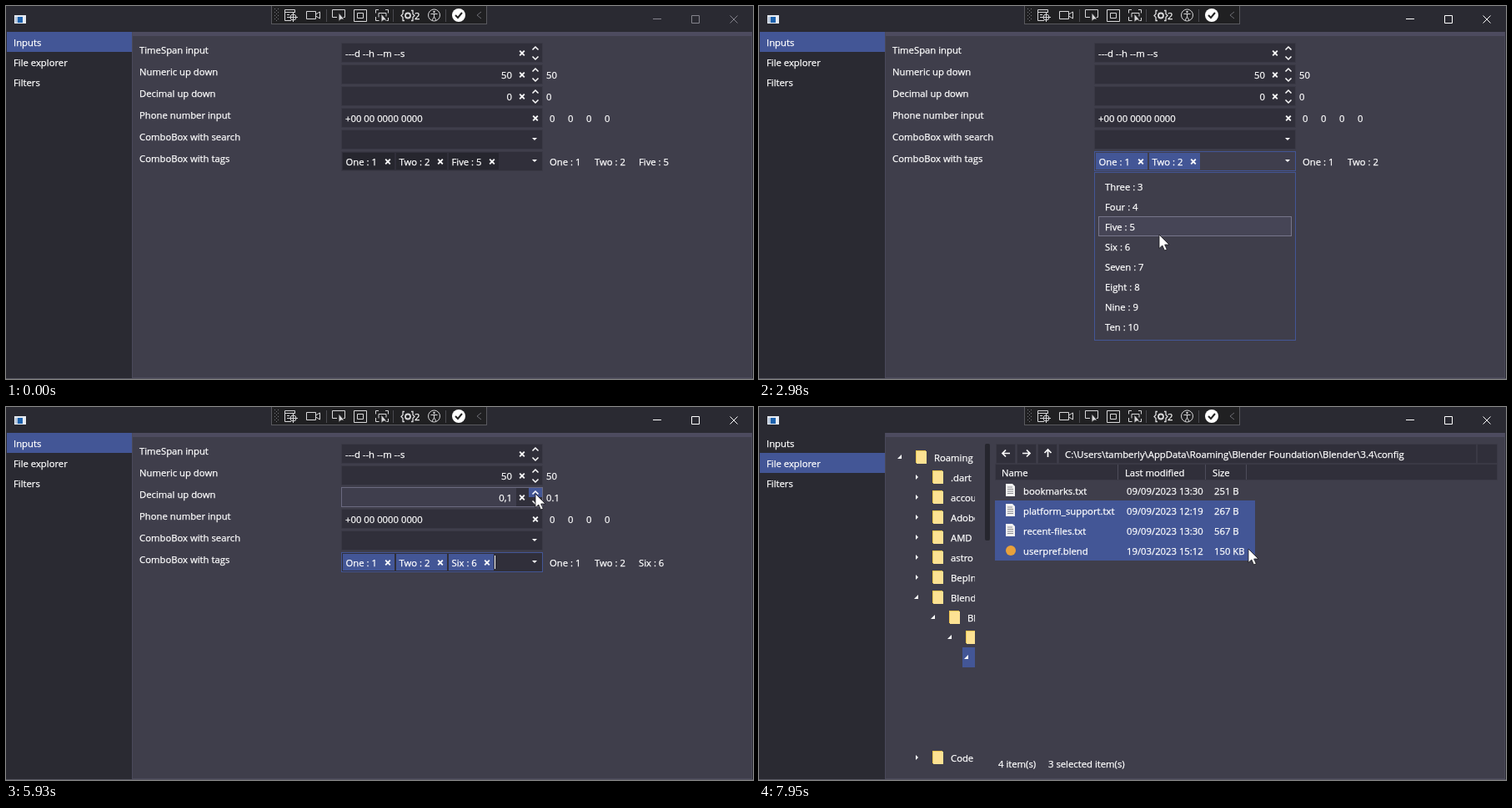
An HTML page for the animation above (8 s loop, 896 px wide and 447 px high).

```html
<!DOCTYPE html>
<html lang="en">
<head>
<meta charset="utf-8">
<title>Input controls</title>
<style>
html, body { margin: 0; width: 100%; height: 100%; overflow: hidden; background: #2a2a32; }
svg { display: block; width: 896px; height: 447px; }
text { font: 11.3px "Open Sans", "Noto Sans", sans-serif; fill: #fff; stroke: #fff; stroke-width: .25px; white-space: pre; }
</style>
</head>
<body>
<svg id="stage" viewBox="0 0 896 447"></svg>
<script>
const LOOP = 8000;
const DARK = '#2a2a32', PANEL = '#3f3e4b', FIELD = '#302f3a', EDGE = '#3a3945',
      LIGHT = '#6b6a80', BLUE = '#435696', WHITE = '#fff';

const rect = (x, y, w, h, fill, stroke) => stroke
  ? `<rect x="${x + .5}" y="${y + .5}" width="${w - 1}" height="${h - 1}" fill="${fill}" stroke="${stroke}"/>`
  : `<rect x="${x}" y="${y}" width="${w}" height="${h}" fill="${fill}"/>`;
const text = (x, y, s, anchor = 'start') => `<text x="${x}" y="${y}" text-anchor="${anchor}">${s}</text>`;
const line = (d, color = WHITE, width = 1, fill = 'none') =>
  `<path d="${d}" fill="${fill}" stroke="${color}" stroke-width="${width}"/>`;
const solid = (d, fill = WHITE) => `<path d="${d}" fill="${fill}"/>`;
const cross = (x, y) => line(`M${x - 2.8} ${y - 2.8}l5.6 5.6m0-5.6l-5.6 5.6`, WHITE, 1.9);
const dropArrow = y => solid(`M631 ${y}h6l-3 3z`);

// Cursor stops: time, x, y
const stops = [
  [460, 812, 313], [1020, 582, 190], [1650, 582, 190], [2210, 635, 187], [2350, 635, 187],
  [2840, 480, 274], [3440, 480, 274], [3580, 476, 289], [3720, 476, 289], [4200, 568, 194],
  [4270, 568, 194], [4480, 493, 105], [4680, 493, 105], [5440, 632, 105], [5580, 635, 104],
  [6550, 635, 104], [7180, 106, 79.4], [7320, 100, 68], [7460, 100, 68], [7950, 587, 170]
];
const clicks = [1440, 2280, 3580, 5510, 6040, 7390];

function pointer(t) {
  const i = stops.findIndex(s => s[0] > t);
  if (i === 0) return [-99, -99];
  if (i < 0) return stops[stops.length - 1].slice(1);
  const [a, ax, ay] = stops[i - 1], [b, bx, by] = stops[i];
  const p = (t - a) / (b - a), e = p * p * (3 - 2 * p);
  return [ax + (bx - ax) * e, ay + (by - ay) * e];
}

function toolbar() {
  const icon = '#d8d8da', back = '#202022';
  const arrow = (x, y) => line(`M${x} ${y}v10.500l2.800-2.500h4.200z`, back, 1, icon);
  let s = rect(318, -1, 259, 23, back, '#59595f');
  for (let y = 3; y < 19; y += 4) s += rect(322, y, 1, 1, '#77777d') + rect(326, y, 1, 1, '#77777d') + rect(324, y + 2, 1, 1, '#77777d');
  for (const x of [384, 464, 527]) s += rect(x, 4, 1, 15, '#4a4a50');
  s += line('M342 17.5H334.500V4.500H346.500V8M334 7.500h12M337 10.500h3M337 13.500h2', icon);
  s += `<circle cx="344.500" cy="13.500" r="3.500" fill="none" stroke="${icon}"/>` + line('M344.500 8v11M339 13.500h11', icon);
  s += line('M360.500 6.500h11v9h-11zM371.500 10l5-3v8l-5-3', icon);
  s += line('M397 13.500h-5.500v-9h15v9h-2', icon) + arrow(399, 8);
  s += line('M417.500 4.500h15v14h-15zM421.500 8.500h7v6h-7z', icon);
  s += line('M447 4.500h-3.500v4M455 4.500h3.500v4M443.500 13v4.500h4M455 17.500h3.500V14M447 13.500v-5h9v4', icon) + arrow(450, 9);
  s += line('M478 5.500h-2v4l-2 2 2 2v4h2M486 5.500h2v4l2 2-2 2v4h-2', icon, 1.300);
  s += `<circle cx="482" cy="11.500" r="3" fill="none" stroke="${icon}" stroke-width="1.800"/>` + text(490, 15.500, '2');
  s += `<circle cx="513.500" cy="11" r="7" fill="none" stroke="${icon}"/>` + line('M509.500 9.500h8M513.500 9v4l-2.500 4M513.500 13l2.500 4', icon);
  s += `<circle cx="513.500" cy="7" r="1.200" fill="${icon}"/><circle cx="543" cy="11" r="8" fill="#fff"/>`;
  return s + line('M539 11l3 3 5-6', '#222', 2) + line('M570 7l-5 4 5 4', '#6c6c72');
}

function chrome(active) {
  const c = active ? WHITE : '#85848d';
  return rect(0, 0, 896, 447, DARK) + rect(151, 31, 744, 415, PANEL, '#4a495a') + rect(152, 31, 743, 5, '#4d4b5f') +
    rect(0, 446, 896, 1, '#55545f') + rect(10, 11, 14, 10, '#e6ebf2') + rect(11, 13, 3, 7, '#b7c7dc') + rect(14, 13, 6, 7, '#1d62ad') +
    line('M776 15.500h10M822.500 11.500h9v9h-9zM868.500 11.500l9 9m0-9l-9 9', c) + toolbar();
}

function sidebar(selected, hover) {
  return ['Inputs', 'File explorer', 'Filters'].map((s, i) => {
    const y = 31 + i * 24;
    const back = i === selected ? rect(1, y, 150, 24, BLUE) : i === hover ? rect(1, y, 150, 24, '#595a70', '#8d8da2') : '';
    return back + text(9, y + 17, s);
  }).join('');
}

function inputs(t, x, y) {
  const focused = t >= 1510, open = t >= 2350 && t < 3790;
  const hover = !open && x >= 402 && x < 644 ? Math.floor((y - 44) / 26) : -1;
  const value = t < 5580 ? '0' : t < 6110 ? '0.1' : '0.2';
  const labels = ['TimeSpan input', 'Numeric up down', 'Decimal up down', 'Phone number input', 'ComboBox with search', 'ComboBox with tags'];
  let s = '';
  labels.forEach((label, i) => {
    const top = 44 + i * 26, hot = i === hover, active = i === 5 && focused;
    const lit = active ? open || t < 2350 : hot;
    s += text(160, top + 13, label) + rect(402, top, 242, 24, lit ? '#3f3e4d' : FIELD, active ? BLUE : hot ? LIGHT : EDGE);
    if (i < 3) {
      if (hot) {
        s += rect(612, top + 1, 31, 22, FIELD);
        if (x >= 627) s += rect(627, top + (y < top + 12 ? 1 : 12), 16, 11, BLUE);
      }
      s += cross(619, top + 12.500) + line(`M631.500 ${top + 8.500}l3.500-3.500 3.500 3.500M631.500 ${top + 16.500}l3.500 3.500 3.500-3.500`, WHITE, 1.500);
    }
  });
  s += text(407, 61, '---d --h --m --s') + text(607, 87, '50', 'end') + text(648, 87, '50');
  s += text(607, 113, value.replace('.', ','), 'end') + text(648, 113, value);
  s += text(407, 139, '+00 00 0000 0000') + cross(635, 134.500);
  for (let i = 0; i < 4; i++) s += text(652 + i * 22, 139, '0');
  s += dropArrow(158) + dropArrow(184);

  // Tags: label, left, width, output x
  const chips = [['One : 1', 404, 62, 652], ['Two : 2', 468, 61, 706]];
  if (t < 1580) chips.push(['Five : 5', 531, 60, 759]);
  if (t >= 3720) chips.push(['Six : 6', 531, 54, 759]);
  const chipColor = focused ? BLUE : hover === 5 ? '#4b4b65' : '#26262e';
  for (const [label, left, width, out] of chips)
    s += rect(left, 176, width, 20, chipColor) + text(left + 3.500, 191, label) + cross(left + width - 8, 186.500) + text(out, 191, label);

  const caret = t >= 2450 && t < 2980 || t >= 3510 && t < 3720 || t >= 4680 && (t - 4680) % 1060 < 530;
  if (caret) s += rect(t < 3720 ? 530 : 586, 178, 1, 16, WHITE);

  if (open) {
    s += rect(402, 199, 242, 202, PANEL, BLUE);
    ['Three : 3', 'Four : 4', 'Five : 5', 'Six : 6', 'Seven : 7', 'Eight : 8', 'Nine : 9', 'Ten : 10'].forEach((label, i) => {
      const top = 204 + i * 24;
      if (y >= top && y < top + 24) s += rect(407, top, 232, 24, '#464556', '#77768b');
      s += text(415, top + 17, label);
    });
  }
  return s;
}

const folder = (x, y) => rect(x, y - 8, 12, 15, '#f3c64f') + rect(x + 1, y - 7, 12, 15, '#fde293');
const sheet = y => solid(`M296 ${y - 8}h8l3 3v12h-11z`, '#f1f1f1') +
  line(`M298 ${y - 4}h6M298 ${y - 1.500}h7M298 ${y + 1}h7M298 ${y + 3.500}h7`, '#8b8b90');

function explorer() {
  let s = '<clipPath id="tree"><path d="M152 40h107v400H152z"/></clipPath><g clip-path="url(#tree)">' + rect(244, 288, 20, 24, BLUE);
  // Tree rows: label, depth, expanded
  const tree = [['Roaming', 0, 1], ['.dart', 1], ['accounts', 1], ['Adobe', 1], ['AMD', 1], ['astro', 1], ['BepInEx', 1],
    ['Blender Foundation', 1, 1], ['Blender', 2, 1], ['3.4', 3, 1], ['config', 4, 1], ['Code', 1]];
  tree.forEach(([label, depth, expanded], i) => {
    const x = 169 + depth * 20, y = label === 'Code' ? 420 : 60 + i * 24;
    s += expanded ? solid(`M${x + 2} ${y - 3}v5h-5z`) : solid(`M${x - 1} ${y - 3}l3 3-3 3z`);
    s += folder(x + 19, y) + text(x + 41, y + 5, label);
  });
  s += '</g><rect x="271" y="44" width="6" height="116" rx="2" fill="#26262e"/>';

  for (const x of [284, 309, 334]) s += rect(x, 44, 24, 24, FIELD, EDGE);
  s += line('M301 55.500h-9m4-4l-4 4 4 4M316 55.500h9m-4-4l4 4-4 4M346.500 60v-9m-4 4l4-4 4 4', WHITE, 1.700);
  s += rect(359, 44, 502, 24, FIELD, EDGE) + rect(861, 44, 25, 24, FIELD, EDGE);
  s += text(367, 61, String.raw`C:\Users\tamberly\AppData\Roaming\Blender Foundation\Blender\3.4\config`);
  s += rect(283, 68, 603, 20, FIELD, EDGE) + text(291, 83, 'Name') + text(439, 83, 'Last modified') + text(544, 83, 'Size');
  for (const x of [430, 535, 584]) s += rect(x, 69, 1, 18, '#4d4c5a');

  s += rect(283, 112, 312, 72, BLUE);
  const files = [['bookmarks.txt', '09/09/2023 13:30', '251 B'], ['platform_support.txt', '09/09/2023 12:19', '267 B'],
    ['recent-files.txt', '09/09/2023 13:30', '567 B'], ['userpref.blend', '19/03/2023 15:12', '150 KB']];
  files.forEach(([name, date, size], i) => {
    const y = 100 + i * 24;
    s += i < 3 ? sheet(y) : `<circle cx="302" cy="${y}" r="6" fill="#e8a13c"/>`;
    s += text(317, y + 5, name) + text(441, y + 5, date) + text(546, y + 5, size);
  });
  return s + text(287, 432, '4 item(s)') + text(347, 432, '3 selected item(s)');
}

function scene(t) {
  const [x, y] = pointer(t), files = t >= 7430;
  const hover = x >= 1 && x < 151 ? Math.floor((y - 31) / 24) : -1;
  let s = chrome(t >= 1510) + sidebar(files ? 1 : 0, hover) + (files ? explorer() : inputs(t, x, y));
  const age = Math.min(...clicks.filter(c => c <= t).map(c => t - c));
  if (age < 280) s += `<circle cx="${x - 1}" cy="${y - 1}" r="12" fill="#c6bb14" opacity="${.78 * (1 - age / 280)}"/>`;
  return s + `<g transform="translate(${x} ${y})">` +
    line('M0 0V16.500l3.800-3.500 2.700 6 2.800-1.200-2.600-5.800H12z', '#16161a', .8, '#fff') + '</g>';
}

const stage = document.getElementById('stage');
let shown;
function frame() {
  const next = scene(performance.now() % LOOP);
  if (next !== shown) stage.innerHTML = shown = next;
  requestAnimationFrame(frame);
}
frame();
</script>
</body>
</html>
```
